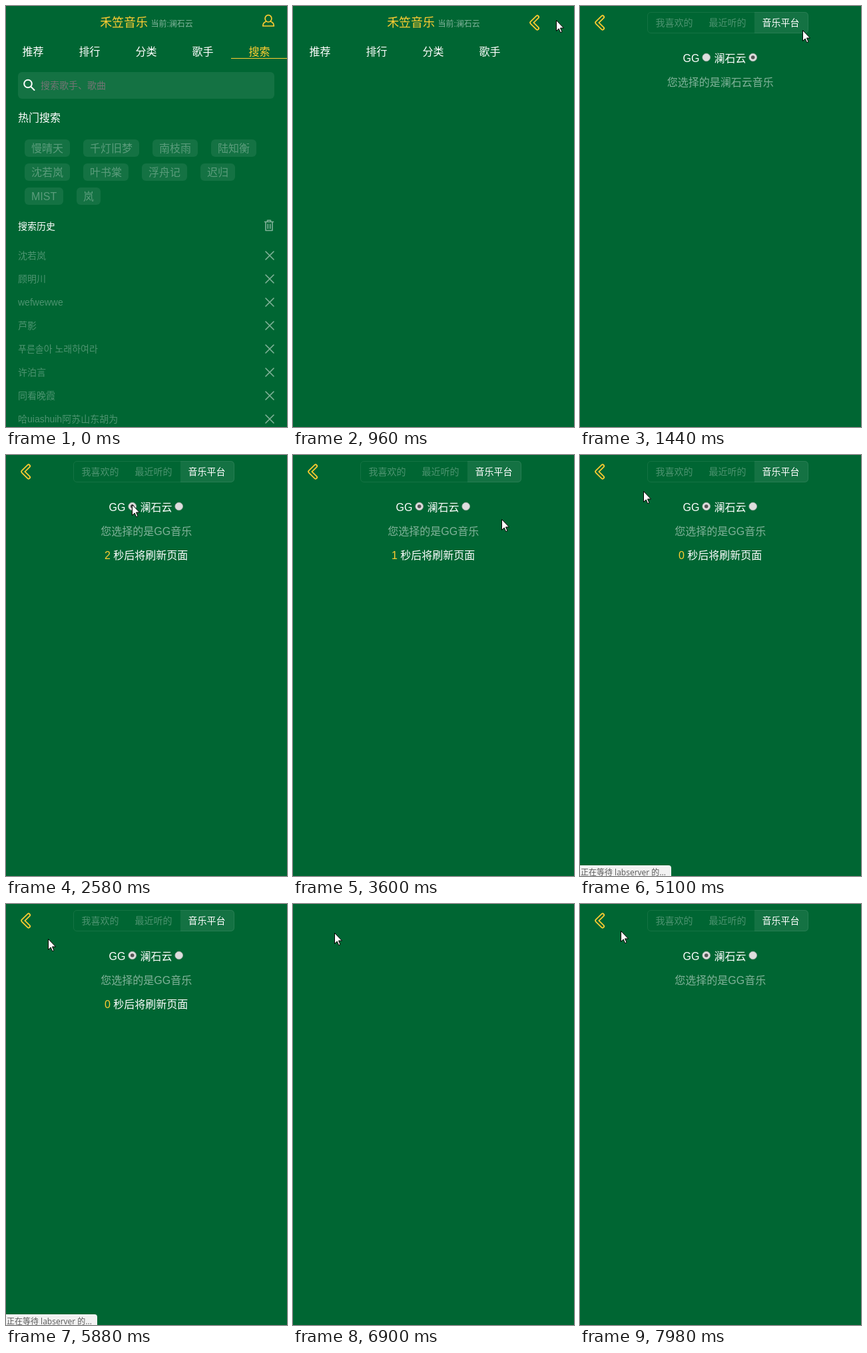
An HTML page that plays this animation: 422x631 px, repeating every 8000 ms.

```html
<!DOCTYPE html>
<html lang="zh-CN">
<head>
<meta charset="utf-8">
<title>音乐</title>
<style>
  html, body { margin: 0; width: 100%; height: 100%; overflow: hidden; background: #063; }
  svg { display: block; }
  text { font-family: "Liberation Sans", "Noto Sans CJK SC", "Noto Sans CJK", sans-serif; fill: #fff; white-space: pre; }
  .gold { fill: #ffcd32; }
  .half { fill: rgba(255,255,255,.5); }
  .dim { fill: rgba(255,255,255,.3); }
  .box { fill: rgba(255,255,255,.08); }
  .line { fill: none; stroke-linecap: round; stroke-linejoin: round; }
  .soft { stroke: rgba(255,255,255,.5); stroke-width: 1.6; }
</style>
</head>
<body>
<svg id="stage" width="422" height="631" xmlns="http://www.w3.org/2000/svg"></svg>
<script>
const LOOP = 8000, STEP = 60;
const CLOUD = '澜石云', GG = 'GG';

// [ms, x, y]
const cursorPath = [
  [60, 419, 31], [240, 409, 28], [600, 395, 21], [960, 395, 21], [1200, 380, 24],
  [1440, 334, 36], [1740, 237, 69], [2220, 187, 73], [2400, 187, 73], [2460, 188, 74],
  [2580, 189, 74], [2640, 262, 94], [2700, 309, 105], [3000, 309, 105], [3060, 310, 105],
  [3180, 310, 105], [3960, 315, 89], [4020, 315, 89], [4140, 317, 89], [4560, 317, 89],
  [4620, 302, 88], [5040, 110, 57], [5220, 66, 49], [5340, 61, 51], [5460, 61, 51],
  [5580, 64, 51], [5700, 64, 51], [5760, 63, 52], [6300, 63, 52], [6600, 62, 45],
  [6840, 62, 45], [7020, 61, 40]
];
const panelSlide = [[960, 333], [1020, 160], [1080, 61], [1140, 17], [1200, 0], [7860, 140], [7920, 72], [7980, 0]];
const statusFade = [[4860, 0], [4980, 1], [6300, 1], [6600, 0]];

// Linear value of one column of a table at t
function sample(table, t, col = 1) {
  const next = table.findIndex(row => row[0] > t);
  if (next === 0) return table[0][col];
  if (next < 0) return table[table.length - 1][col];
  const a = table[next - 1], b = table[next];
  return a[col] + (b[col] - a[col]) * (t - a[0]) / (b[0] - a[0]);
}

// Text placed by the vertical centre of its characters
const text = (x, mid, size, str, cls = '', more = '') =>
  `<text x="${x}" y="${mid + size * .38}" font-size="${size}" class="${cls}" ${more}>${str}</text>`;
const centred = (x, mid, size, str, cls = '', id = '') =>
  text(x, mid, size, str, cls, 'text-anchor="middle"' + (id && ` id="${id}"`));
const box = (x, y, w, h, r) =>
  `<rect class="box" x="${x}" y="${y}" width="${w}" height="${h}" rx="${r}"/>`;

function header() {
  const tabs = ['推荐', '排行', '分类', '歌手', '搜索']
    .map((name, i) => centred(40.5 + 85 * i, 68, 16, name, '', 'tab' + i)).join('');
  return `<g id="header">
    <text x="211" y="30.5" font-size="18" class="gold" text-anchor="middle">禾笠音乐<tspan
      dx="4.4" font-size="12" class="half" id="current"></tspan></text>
    <g class="line" stroke="#ffcd32" stroke-width="1.7">
      <ellipse cx="394" cy="18.8" rx="4.9" ry="5.2"/>
      <path d="M390.5 23.2C387.5 24.2 385.8 26.5 385.8 30H402.3C402.3 26.5 400.5 24.2 397.5 23.2"/>
    </g>${tabs}</g>`;
}

function tags() {
  const rows = [
    ['慢晴天', '千灯旧梦', '南枝雨', '陆知衡'],
    ['沈若岚', '叶书棠', '浮舟记', '迟归'],
    ['MIST', '岚']
  ];
  return rows.map((row, r) => {
    let x = 28;
    const y = 200 + 36 * r;
    return row.map(name => {
      const w = 20 + (name === 'MIST' ? 38 : 16 * name.length);
      const tag = box(x, y, w, 26, 6) + text(x + 10, y + 13, 16, name, 'dim');
      x += w + 20;
      return tag;
    }).join('');
  }).join('');
}

function history() {
  const words = ['沈若岚', '顾明川', 'wefwewwe', '芦影', '푸른솔아 노래하여라', '许泊言', '同看晚霞', '哈uiashuih阿苏山东胡为'];
  return words.map((word, i) => {
    const y = 374 + 35 * i;
    return text(18, y, 14, word, 'dim') +
      `<path class="line soft" d="M390 ${y - 6}l12 12m0 -12l-12 12"/>`;
  }).join('');
}

function search() {
  return `<g id="search">
    <rect class="gold" x="338" y="78" width="84" height="1"/>
    ${box(18, 99, 385, 40, 6)}
    <g class="line" stroke="#fff" stroke-width="2">
      <circle cx="33" cy="116.5" r="5.8"/><path d="M37.5 121l5 5"/>
    </g>
    ${text(52, 119, 14, '搜索歌手、歌曲', '', 'style="fill:#757575"')}
    ${text(18, 167, 16, '热门搜索')}
    ${tags()}
    ${text(18, 330, 14, '搜索历史', '', 'font-weight="500"')}
    <path class="line soft" d="M388.5 323.5h13M392.5 323v-1.8h5v1.8M390 324v12.5h10V324M393.3 327v6.5M396.7 327v6.5"/>
    ${history()}</g>`;
}

const radio = (x, id) =>
  `<circle cx="${x}" cy="77" r="5.8" fill="#dedede" stroke="#b4b4b4" stroke-width=".8"/>
   <circle cx="${x}" cy="77" r="2.8" fill="#555" id="${id}"/>`;

function panel() {
  const tabs = ['我喜欢的', '最近听的', '音乐平台']
    .map((name, i) => centred(141.5 + 80 * i, 25, 14, name, i < 2 ? 'dim' : '')).join('');
  const chevron = 'M34 16.5L25.3 25L34 33.5';
  return `<g id="panel">
    <rect width="422" height="631" fill="#063"/>
    <path class="line" stroke="#ffcd32" stroke-width="6" d="${chevron}"/>
    <path class="line" stroke="#063" stroke-width="2.5" d="${chevron}"/>
    <rect x="101.5" y="9.5" width="241" height="31" rx="5" fill="none" stroke="#fff" stroke-opacity=".08"/>
    <path class="box" d="M262 9H338a5 5 0 0 1 5 5V36a5 5 0 0 1 -5 5H262Z"/>
    ${tabs}
    ${text(154.5, 78, 16, GG)}${radio(189.7, 'dotGG')}
    ${text(201.5, 78, 16, CLOUD)}${radio(259.7, 'dotCloud')}
    ${centred(210.7, 114, 16, '', 'half', 'choice')}
    ${centred(210.7, 150, 16, '<tspan class="gold" id="count"></tspan> 秒后将刷新页面', '', 'notice')}
  </g>`;
}

const status = `<g id="status">
  <path d="M0 615H133a4 4 0 0 1 4 4V631H0Z" fill="#f2f2f2"/>
  <text x="1" y="630" font-size="12" style="fill:#5a5a5a;font-family:'Open Sans','Noto Sans CJK SC','Noto Sans CJK',sans-serif">正在等待 labserver 的...</text></g>`;

const cursor = `<path id="cursor" fill="#fff" stroke="#000"
  d="M.5 .5V16.5L4.2 13L6.7 18.7L9 17.7L6.5 12H11.5Z"/>`;

document.getElementById('stage').innerHTML = header() + search() + panel() + status + cursor;

const el = id => document.getElementById(id);
const show = (id, on) => { el(id).style.display = on ? '' : 'none'; };
const write = (id, str) => { if (el(id).textContent !== str) el(id).textContent = str; };
const move = (id, x, y) => el(id).setAttribute('transform', `translate(${x} ${y})`);

function draw(t) {
  const picked = t >= 2580, reloaded = t >= 6900;
  show('header', !reloaded || t >= 6960);
  show('search', t < 960);
  el('tab4').setAttribute('class', t < 960 ? 'gold' : '');
  write('current', '当前:' + (reloaded ? GG : CLOUD));

  show('panel', (t >= 960 && !reloaded) || t >= 7920);
  move('panel', t < 7920 && t >= 1200 ? 0 : Math.round(sample(panelSlide, t)), 0);
  show('dotGG', picked);
  show('dotCloud', !picked);
  write('choice', `您选择的是${picked ? GG : CLOUD}音乐`);
  show('notice', picked && !reloaded);
  write('count', t < 3600 ? '2' : t < 4620 ? '1' : '0');

  el('status').style.opacity = sample(statusFade, t);
  show('cursor', t >= 60);
  move('cursor', Math.round(sample(cursorPath, t, 1)), Math.round(sample(cursorPath, t, 2)));
}

const start = performance.now();
function tick() {
  const t = (performance.now() - start) % LOOP;
  draw(Math.floor(t / STEP) * STEP);
  requestAnimationFrame(tick);
}
tick();
</script>
</body>
</html>
```
